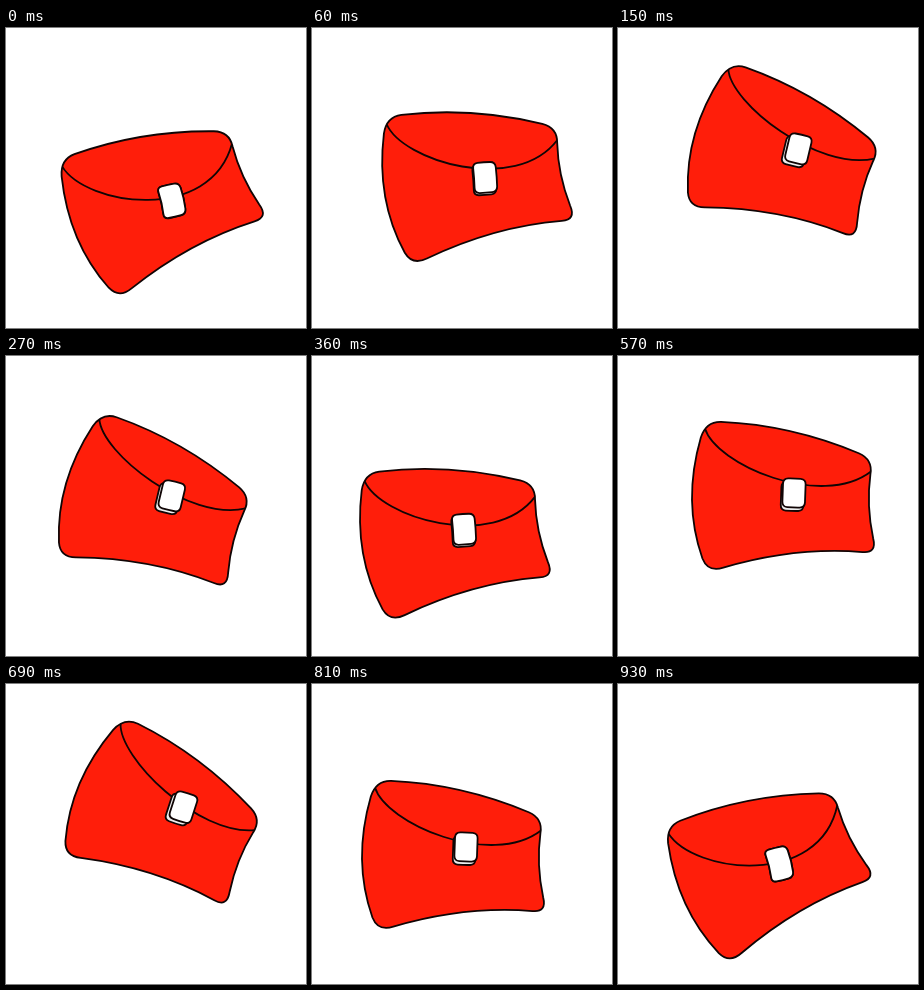
An HTML page with a canvas that plays this animation: 300 px wide and 300 px high, repeating every 0.96 s.

```html
<!DOCTYPE html>
<html lang="en">
<head>
<meta charset="utf-8">
<title>Swinging purse</title>
<style>
  html, body { margin: 0; width: 100%; height: 100%; overflow: hidden; background: #fff; }
  canvas { display: block; }
</style>
</head>
<body>
<canvas id="stage" width="300" height="300"></canvas>
<script>
const ctx = document.getElementById("stage").getContext("2d");
const STEP = 30, SWING = 480, PEAK = 210;
const RED = "#ff1e0a", INK = "#100505";
const rad = degrees => degrees * Math.PI / 180;

// A piece of a quadratic curve: points when a = b, its control otherwise.
function blossom(p, q, r, a, b) {
  return [0, 1].map(k => (1 - a) * (1 - b) * p[k] +
    (a + b - 2 * a * b) * q[k] + a * b * r[k]);
}

// Four bent edges joined by rounded corners; bend i follows corner i.
function softQuad(corners, bends, radius) {
  const path = new Path2D();
  const edges = corners.map((p, i) => {
    const q = bends[i], r = corners[(i + 1) % 4];
    const a = radius / Math.hypot(r[0] - p[0], r[1] - p[1]), b = 1 - a;
    return { p, start: blossom(p, q, r, a, a), mid: blossom(p, q, r, a, b), end: blossom(p, q, r, b, b) };
  });
  path.moveTo(...edges[3].end);
  for (const { p, start, mid, end } of edges) {
    path.quadraticCurveTo(...p, ...start);
    path.quadraticCurveTo(...mid, ...end);
  }
  path.closePath();
  return path;
}

// The bag is rigid, measured from its centre: top, right, bottom, left edge.
const BAG = softQuad(
  [[-85, -80], [82, -42], [86, 52], [-83, 71]],
  [[1, -79.5], [72, 4], [4, 42], [-114, 1]], 15);

function paint(path, fill) {
  ctx.fillStyle = fill;
  ctx.fill(path);
  ctx.stroke(path);
}

// The flap opens deeper as the bag drops.
function drawFlap(tilt) {
  const sag = (1 - tilt) ** 2 / 4;
  ctx.save();
  ctx.clip(BAG);
  ctx.beginPath();
  ctx.moveTo(-86, -73);
  ctx.bezierCurveTo(-74 - 5 * sag, -41 + 15 * sag, 30, -2 + 41 * sag, 80, -30);
  ctx.stroke();
  ctx.restore();
}

function drawClasp(tilt, sway) {
  const low = Math.max(0, -tilt), lift = 1 + tilt;
  const w = 11.3, h = 14 + 2 * low, bow = 2.5 * low;
  const face = softQuad([[-w, -h], [w, -h], [w, h], [-w, h]],
    [[0, -h - 1], [w + bow, 0], [0, h + 1], [-w + bow, 0]], 5);
  ctx.save();
  ctx.translate(4 + 1.5 * tilt + sway, -11 - 11 * tilt - 2.5 * sway);
  ctx.rotate(rad(2 - 8 * tilt));
  ctx.save();
  ctx.translate(-1.5 * lift, 3.5 * Math.min(1, lift));
  paint(face, "#eee");
  ctx.restore();
  paint(face, "#fff");
  ctx.restore();
}

function draw(now) {
  const time = Math.floor(now / STEP) * STEP % SWING;
  const angle = (time - PEAK) / SWING * 2 * Math.PI;
  const tilt = Math.cos(angle), sway = Math.sin(angle);
  ctx.fillStyle = "#fff";
  ctx.fillRect(0, 0, 300, 300);
  ctx.strokeStyle = INK;
  ctx.lineWidth = 1.8;
  ctx.save();
  ctx.translate(161 + 2.5 * tilt - 12 * sway, 161 - 20 * tilt + 15.5 * sway);
  ctx.rotate(rad(24 * tilt));
  paint(BAG, RED);
  drawFlap(tilt);
  drawClasp(tilt, sway);
  ctx.restore();
}

const begin = performance.now();
function tick() {
  draw(performance.now() - begin);
  requestAnimationFrame(tick);
}
tick();
</script>
</body>
</html>
```
